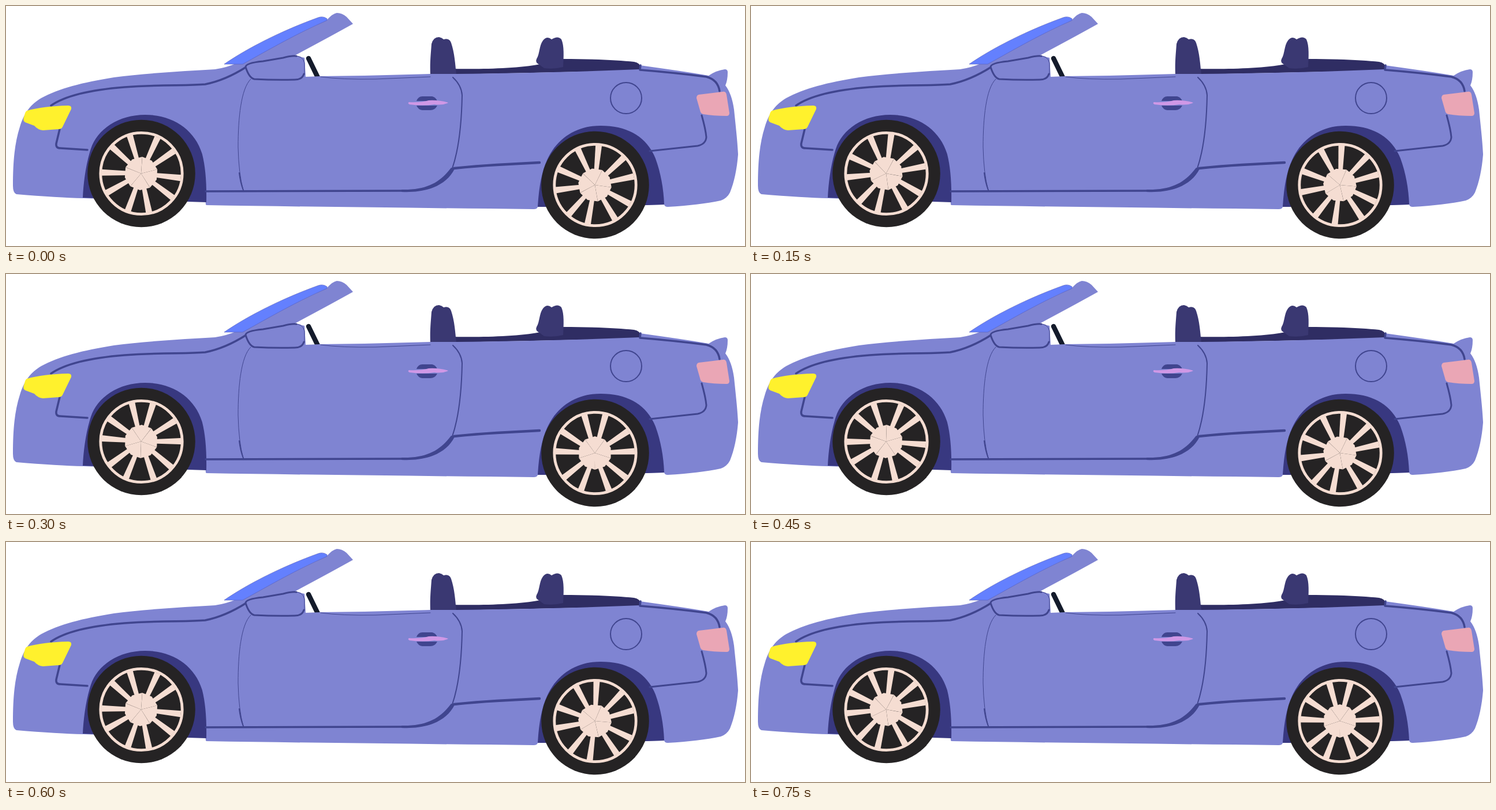
An HTML page that plays this animation: 1280 px wide and 417 px high, repeating every 900 ms.

```html
<!DOCTYPE html>
<html lang="en">
<head>
<meta charset="utf-8">
<title>Convertible</title>
<style>
html, body { margin: 0; width: 100%; height: 100%; overflow: hidden; background: #fff; }
svg { display: block; width: 100%; height: 100%; }
.line { fill: none; stroke: #40458f; stroke-width: 3.5; stroke-linecap: round; stroke-linejoin: round; }
.thin { stroke-width: 1; }
.shade { fill: #40458f; }
.body { fill: #7f84d2; }
.arch { fill: #383880; }
.seat { fill: #3a3872; }
</style>
</head>
<body>
<svg viewBox="0 0 1280 417">
  <!-- cabin -->
  <path fill="#2f2d63" d="M775 109C820 110 885 109 925 101L965 92C1010 92 1060 94 1088 97Q1098 99 1099 106L1098 112L775 119Z"/>
  <path class="seat" d="M735 120C734 98 736 82 737 66Q740 54 750 54Q755 55 758 58Q768 55 771 64C777 82 778 100 780 119Z"/>
  <path class="seat" d="M924 102Q916 98 919 92C925 82 923 70 930 60Q937 51 945 58Q956 51 962 58C967 69 966 88 965 106Q950 110 932 108Z"/>
  <path d="M524 91L540 124" stroke="#141b2b" stroke-width="8.500" stroke-linecap="round"/>

  <!-- shell -->
  <path class="body" d="M18 327Q12 325 12 312C12 270 15 238 24 210C32 184 43 171 61 160C92 143 132 133 187 124C240 117 310 113 362 110Q382 107 398 100L556 24Q566 13 573 12Q582 12 590 19L601 31Q560 54 500 86L517 90L519 123L545 122Q640 121 736 118L780 118C880 117 1000 114 1097 110L1098 103C1140 109 1184 115 1217 121Q1230 112 1245 110Q1250 110 1250 115Q1250 129 1246 138Q1257 152 1261 180C1264 210 1267 235 1268 258C1266 284 1261 307 1254 324Q1249 334 1238 338Q1200 346 1146 349Q1141 349 1140 345L921 349Q920 353 914 353C730 351 530 349 348 346Q345 346 346 340L134 334Q90 333 18 327Z"/>
  <path fill="#6480fe" stroke="#5860c0" stroke-width=".7" d="M378 101C420 72 480 42 541 20Q549 17 556 22L556 25C503 48 455 76 410 101Z"/>

  <!-- wheel arches -->
  <path class="arch" d="M133 333C134 310 138 275 147 248C158 214 195 189 241 189C290 189 328 216 340 258Q348 290 347 341L250 338Z"/>
  <path class="arch" d="M921 349C923 317 927 285 942 258C960 226 992 208 1030 208C1078 208 1110 228 1125 265C1134 290 1139 317 1140 345L1020 349Z"/>

  <!-- panel lines -->
  <path class="line" d="M78 173C105 154 155 145 205 141C270 136 310 139 345 136Q380 129 416 106"/>
  <path class="line" d="M93 214L87 239Q86 247 94 247L141 250"/>
  <path class="line thin" d="M424 127C407 143 402 195 402 245Q403 292 411 320"/>
  <path class="line" style="stroke-width:2" d="M404 290Q406 307 411 320"/>
  <path class="line" d="M346 322L690 321"/>
  <path class="shade" d="M685 319C730 320 752 306 771 281L777 283C762 313 727 325 685 323Z"/>
  <path class="line" style="stroke-width:2" d="M774 124Q789 138 790 155C789 210 784 250 773 282"/>
  <path class="line" style="stroke-width:4.500" d="M776 282Q815 278 850 276L924 272"/>
  <path class="line thin" d="M545 123Q580 128 640 127L735 123"/>
  <path class="line" d="M1099 103L1098 111Q1160 116 1213 123Q1233 128 1236 148"/>
  <path class="line" style="stroke-width:3" d="M1205 190Q1212 215 1213 228Q1212 240 1198 243L1115 252"/>
  <circle class="line" style="stroke-width:2" cx="1074" cy="160" r="27"/>
  <path class="body" d="M415 104Q420 99 445 97L496 87Q514 84 517 98Q520 122 511 126Q500 130 430 127Q424 126 415 108Z"/>
  <path class="line" style="stroke-width:3" d="M503 87Q495 86 480 90L445 96Q415 99 415 106Q421 125 430 127Q465 129 500 128Q513 128 516 118"/>
  <path class="line thin" d="M500 87Q514 86 517 99L517 119"/>

  <!-- handle and lights -->
  <path class="shade" d="M711 165Q714 157 721 157L738 157Q744 158 747 165ZM711 173L747 173Q743 181 735 181L721 181Q714 180 711 173Z"/>
  <path fill="#cf98e6" d="M698 167Q718 168 732 164Q751 163 766 168Q757 173 742 171Q722 174 699 171Q695 169 698 167Z"/>
  <path fill="#fff12d" d="M36 182Q64 174 108 173Q114 173 113 179L98 210Q96 214 91 214L64 216Q55 215 49 208L33 202Q28 199 32 190Q33 184 36 182Z"/>
  <path fill="#eaa6b5" d="M1200 154L1241 149Q1247 148 1248 154L1253 186Q1253 191 1248 191Q1225 191 1208 188Q1203 187 1202 181L1196 160Q1196 155 1200 154Z"/>

  <defs>
    <g id="tyre"><circle r="93.300" fill="#252324"/><circle r="70.700" fill="none" stroke="#f5ddd2" stroke-width="4.800"/></g>
    <path id="spoke" d="M18-3.500L69-5.500L69 5.500L18 3.500Z"/>
    <g id="pair">
      <use href="#spoke" transform="rotate(-15.500)"/>
      <use href="#spoke" transform="rotate(15.500)"/>
      <path d="M0 0L23.500-17L29 0L23.500 17Z"/>
    </g>
  </defs>
  <use href="#tyre" x="234.500" y="291"/>
  <g id="front" fill="#f5ddd2"></g>
  <use href="#tyre" x="1020.500" y="311"/>
  <g id="rear" fill="#f5ddd2"></g>
</svg>
<script>
const STEP = 150;
const wheels = [
  { id: 'front', x: 234, y: 291, angles: [22, 46, 56, 20, 22, 46] },
  { id: 'rear', x: 1020, y: 311, angles: [44, 41, 54, 44, 41, 54] }
];

for (const w of wheels) {
  w.node = document.getElementById(w.id);
  w.node.innerHTML = [0, 1, 2, 3, 4]
    .map(i => `<use href="#pair" transform="rotate(${i * 72})"/>`).join('');
}

function draw(now) {
  const pose = Math.floor(now / STEP) % 6;
  for (const { node, x, y, angles } of wheels) {
    node.setAttribute('transform', `translate(${x} ${y}) rotate(${angles[pose]})`);
  }
  requestAnimationFrame(draw);
}
draw(0);
</script>
</body>
</html>
```
